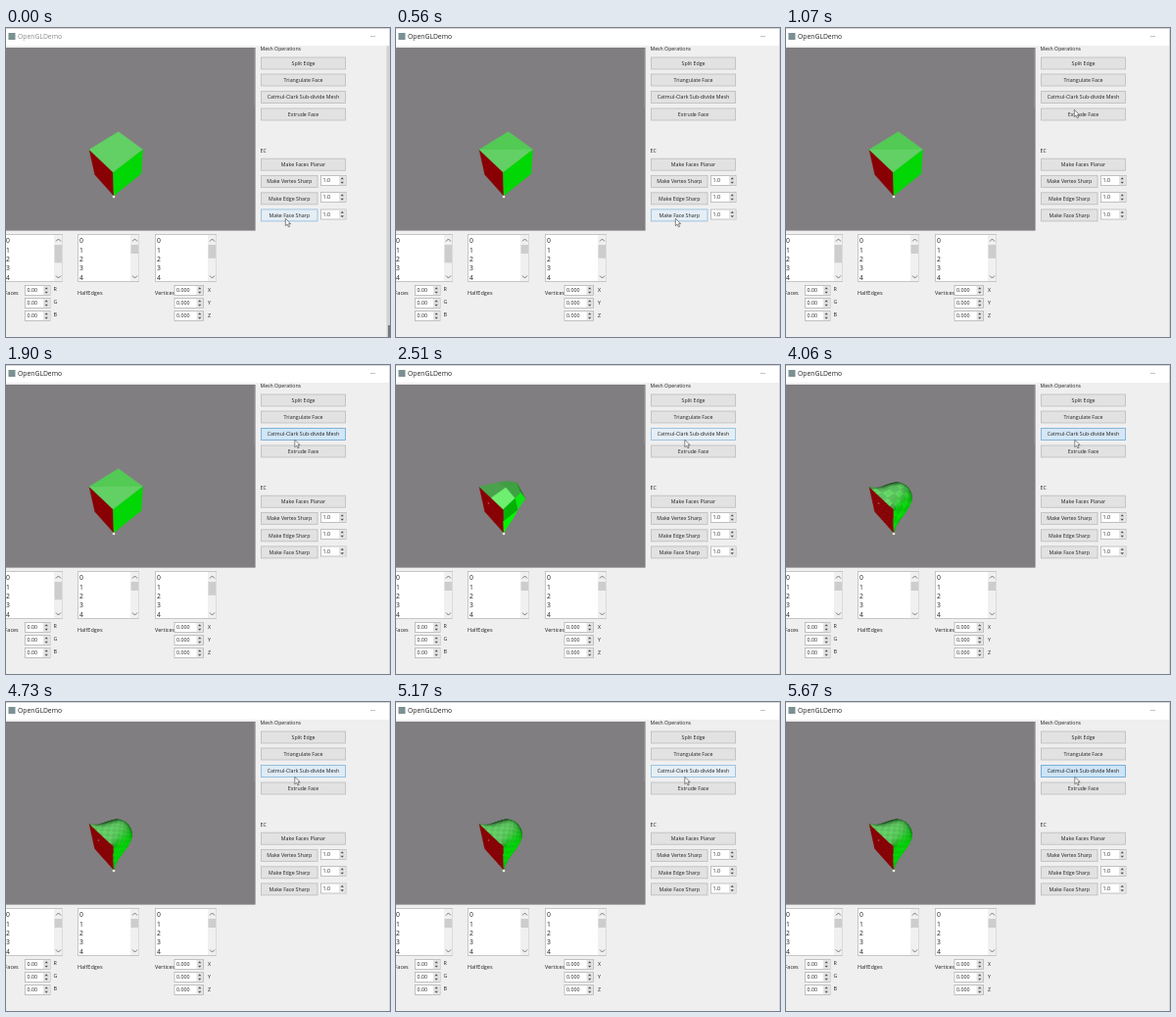
These frames come from a looping animation (392x315 px, 5770 ms). An HTML page:

```html
<!DOCTYPE html>
<html>
<head>
<meta charset="utf-8">
<style>
  html, body { margin: 0; width: 100%; height: 100%; overflow: hidden; background: #f0f0f0; }
  svg { display: block; width: 392px; height: 315px; font-family: "Open Sans", "Noto Sans", sans-serif; }
</style>
</head>
<body>
<svg id="stage" viewBox="0 0 392 315"></svg>
<script>
const LOOP = 5770;
const stage = document.getElementById('stage');

// ---- Widgets ----
const rect = (x, y, w, h, fill, extra = '') =>
  `<rect x="${x}" y="${y}" width="${w}" height="${h}" fill="${fill}" ${extra}/>`;
const text = (x, y, label, size = 5.3, extra = '') =>
  `<text x="${x}" y="${y + size * 0.36}" font-size="${size}" fill="#222" ${extra}>${label}</text>`;
const line = (d, color = '#777', width = 1) =>
  `<path d="${d}" fill="none" stroke="${color}" stroke-width="${width}"/>`;

function button(y, label, width = 86, id = '') {
  return rect(260.5, y - 6, width, 12, '#e2e2e2', `stroke="#c0c0c0" stroke-width=".9" ${id && `id="${id}"`}`) +
    text(260.5 + width / 2, y, label, 5.25, 'text-anchor="middle"');
}

function spinBox(x, y, width, value) {
  const arrowX = x + width - 4.5;
  return rect(x + .5, y - 5, width - 1, 10, '#fff', 'stroke="#b4b4b4" stroke-width=".8"') +
    rect(arrowX - 3, y - 4.6, 6.5, 9.2, '#e4e4e4') +
    text(x + 2.5, y, value) +
    `<path d="M${arrowX - 1.5} ${y - 1.3}l1.7-2l1.7 2zM${arrowX - 1.5} ${y + 1.3}l1.7 2l1.7-2z" fill="#555"/>`;
}

function listBox(x, width) {
  const bar = x + width - 9;
  return rect(x + .5, 210.5, width - 1, 48, '#fff', 'stroke="#bbb" stroke-width=".8"') +
    rect(bar, 211, 8.5, 47, '#f0f0f0') + rect(bar + .5, 221, 7.5, 9, '#cdcdcd', 'class="thumb"') +
    line(`M${bar + 2} 217.5l2.5-2.5l2.5 2.5M${bar + 2} 252.5l2.5 2.5l2.5-2.5`) +
    [0, 1, 2, 3, 4].map(n => text(x + 2, 217 + n * 9.3, n, 6.8)).join('');
}

const rows = [267.5, 280.5, 293.5];
const windowParts = [
  rect(0, 0, 392, 315, '#f0eff0'),
  rect(0, 0, 392, 18, '#fff'),
  rect(0, 0, 392, 1, '#d4d4d4'),
  rect(2.5, 5, 7, 7, '#7b9092'),
  text(12, 8.5, 'OpenGLDemo', 6.8, 'id="title"'),
  line('M372 8.5h5', '#aaa', .7),
  rect(0, 20, 254.6, 186.6, '#807e80'),
  line('M253.5 21v60', '#959395', .7),
  rect(391, 0, 1, 315, '#d5d5d5'),
  `<g id="edge">${rect(388.5, 18, 3.5, 297, '#d2d2d2')}${rect(390, 303, 2, 12, '#777')}</g>`,
  text(259.5, 21, 'Mesh Operations', 5.2),
  button(36, 'Split Edge'),
  button(53, 'Triangulate Face'),
  button(70.5, 'Catmul-Clark Sub-divide Mesh', 86, 'subdivideButton'),
  button(88, 'Extrude Face'),
  text(259.5, 125, 'EC'),
  button(139.2, 'Make Faces Planar'),
  button(156.4, 'Make Vertex Sharp', 57.5), spinBox(321, 155.5, 26.5, '1.0'),
  button(173.8, 'Make Edge Sharp', 57.5), spinBox(321, 172.5, 26.5, '1.0'),
  button(190.9, 'Make Face Sharp', 57.5, 'faceButton'), spinBox(321, 190, 26.5, '1.0'),
  listBox(-2, 60), listBox(73, 63), listBox(152, 63),
  text(-1.5, 270, 'Faces', 5.5), text(73, 270, 'HalfEdges', 5.5), text(152, 270, 'Vertices', 5.5),
  ...rows.flatMap((y, i) => [
    spinBox(19, y, 26.5, '0.00'), text(48.5, y - 1.5, 'RGB'[i]),
    spinBox(171.5, y, 30.5, '0.000'), text(206, y - .5, 'XYZ'[i])
  ])
];

// ---- Subdivision mesh, in unit-cube coordinates (u, v, w) ----
const average = list => [0, 1, 2].map(k => list.reduce((sum, p) => sum + p[k], 0) / list.length);
const onSharpFace = p => p[0] === 0;

const cube = {
  points: [...Array(8).keys()].map(i => [i >> 2, i >> 1 & 1, i & 1]),
  faces: [[0, 1, 3, 2], [4, 6, 7, 5], [0, 4, 5, 1], [2, 3, 7, 6], [0, 2, 6, 4], [1, 5, 7, 3]]
};

function subdivide({ points, faces }) {
  const centers = faces.map(face => average(face.map(i => points[i])));
  const edges = new Map();
  const around = points.map(() => ({ centers: [], mids: [] }));
  const edgeKey = (a, b) => Math.min(a, b) + '-' + Math.max(a, b);

  faces.forEach((face, f) => face.forEach((a, k) => {
    const b = face[(k + 1) % 4], key = edgeKey(a, b);
    around[a].centers.push(centers[f]);
    if (!edges.has(key)) {
      const mid = average([points[a], points[b]]);
      edges.set(key, { ends: [points[a], points[b]], mid, centers: [], index: points.length + faces.length + edges.size });
      around[a].mids.push(mid);
      around[b].mids.push(mid);
    }
    edges.get(key).centers.push(centers[f]);
  }));

  const moved = points.map((p, i) => {
    if (onSharpFace(p)) return p;
    const F = average(around[i].centers), R = average(around[i].mids), n = around[i].mids.length;
    return p.map((x, k) => (F[k] + 2 * R[k] + (n - 3) * x) / n);
  });
  const edgePoints = [...edges.values()].map(e =>
    e.ends.every(onSharpFace) ? e.mid : average([...e.ends, ...e.centers]));
  const edgeIndex = (a, b) => edges.get(edgeKey(a, b)).index;

  return {
    points: [...moved, ...centers, ...edgePoints],
    faces: faces.flatMap((face, f) => face.map((a, k) =>
      [a, edgeIndex(a, face[(k + 1) % 4]), points.length + f, edgeIndex(face[(k + 3) % 4], a)]))
  };
}

// Screen positions of the cube corners, in the order of cube.points
const corners = [[85, 124], [90.7, 149.5], [109.3, 147], [110, 171], [114.7, 105.7], [111, 121], [139.5, 123.7], [138, 148.5]];
const project = p => [0, 1].map(axis => corners.reduce((sum, corner, i) =>
  sum + corner[axis] * cube.points[i].reduce((weight, bit, k) => weight * (bit ? p[k] : 1 - p[k]), 1), 0));

const minus = (a, b) => a.map((x, k) => x - b[k]);
const cross = (a, b) => [a[1] * b[2] - a[2] * b[1], a[2] * b[0] - a[0] * b[2], a[0] * b[1] - a[1] * b[0]];
const RED = 'rgb(137,0,4)';
const sideColors = [[[0, 150, 0], [0, 80, 8]], [[8, 35, 12], [0, 215, 4]], [[98, 208, 100], [0, 110, 0]]];

// Sides turned away from the light darken quickly; alternate facets differ a little.
function shade(quad, normal, tint) {
  if (quad.every(onSharpFace)) return RED;
  const weights = normal.map((x, k) => x * x * (k === 1 && x < 0 ? 4 : 1));
  const total = weights[0] + weights[1] + weights[2];
  const rgb = [0, 1, 2].map(c => tint * normal.reduce((sum, x, k) =>
    sum + weights[k] / total * sideColors[k][x > 0 ? 1 : 0][c], 0));
  return `rgb(${rgb.map(Math.round)})`;
}

function drawMesh({ points, faces }, level) {
  const contrast = level ? .16 / level : 0;
  const quads = faces.map((face, f) => {
    const quad = face.map(i => points[i]), flat = quad.map(project);
    const [dx1, dy1] = minus(flat[2], flat[0]), [dx2, dy2] = minus(flat[3], flat[1]);
    const center = average(quad);
    const normal = cross(minus(quad[2], quad[0]), minus(quad[3], quad[1]));
    return {
      visible: dx1 * dy2 - dy1 * dx2 < 0,
      depth: .444 * center[0] - .627 * center[1] + center[2],
      flat, color: shade(quad, normal, 1 + (f % 2 ? contrast : -contrast))
    };
  }).filter(q => q.visible).sort((a, b) => b.depth - a.depth);
  const shapes = quads.map(q => {
    const path = q.flat.map(p => p.map(x => x.toFixed(2))).join(' ');
    return `<polygon points="${path}" fill="${q.color}" stroke="${q.color}" stroke-width=".4"/>`;
  });
  const mark = level ? '<circle cx="94.5" cy="141" r=".8" fill="#b66"/>' : '';
  return `<g class="mesh">${shapes.join('')}${mark}</g>`;
}

const meshes = [cube];
while (meshes.length < 5) meshes.push(subdivide(meshes[meshes.length - 1]));

stage.innerHTML = windowParts.join('') + meshes.map(drawMesh).join('') +
  '<path id="diagonal" d="M85 124L139.5 123.7L114.7 105.7z" fill="#0a0" opacity=".16"/>' +
  '<circle cx="110" cy="172" r="1.3" fill="#fff4e4"/>' +
  '<path id="cursor" d="M0 0v7.4l1.8-1.6l1.3 2.7l1.2-.5l-1.2-2.7h2.3z" fill="#fff" stroke="#555" stroke-width=".7"/>';

// ---- Timeline ----
const byId = id => document.getElementById(id);
const [title, edge, diagonal, cursor, faceButton, subdivideButton] =
  ['title', 'edge', 'diagonal', 'cursor', 'faceButton', 'subdivideButton'].map(byId);
const meshGroups = document.querySelectorAll('.mesh');
const thumbs = document.querySelectorAll('.thumb');
const progress = (t, from, to) => Math.min(1, Math.max(0, (t - from) / (to - from)));
const ease = x => x * x * (3 - 2 * x);
const mix = (a, b, x) => `rgb(${a.map((v, k) => Math.round(v + (b[k] - v) * x))})`;
const show = (element, visible) => element.style.display = visible ? '' : 'none';
const clicks = [2510, 3090, 3700, 4310];
const glows = [[2510, 3060], [3090, 3580], [3700, 4250], [4580, 5140], [5170, 5670]];
const GREY = [226, 226, 226], PALE = [229, 238, 245], BLUE = [204, 228, 246];
const GREY_EDGE = [192, 192, 192], PALE_EDGE = [150, 193, 222], BLUE_EDGE = [112, 170, 215];

function paintButton(element, fill, border) {
  element.setAttribute('fill', fill);
  element.setAttribute('stroke', border);
}

function render(t) {
  const level = clicks.filter(click => t >= click).length;
  meshGroups.forEach((group, i) => show(group, i === level));
  show(diagonal, t >= 60 && level === 0);
  show(edge, t < 60);
  title.setAttribute('fill', t < 60 ? '#888' : '#222');

  // Scroll thumbs shrink as the face, half-edge and vertex lists grow.
  const { faces, points } = meshes[level];
  [faces.length, faces.length * 4, points.length].forEach((count, i) =>
    thumbs[i].setAttribute('height', Math.max(9, 22 * 5 / count)));

  const rise = ease(progress(t, 640, 1070)), settle = ease(progress(t, 1210, 1440));
  cursor.setAttribute('transform', `translate(${285.3 + 9 * rise + .5 * settle} ${194.3 - 111 * rise - 7 * settle})`);

  const leave = progress(t, 660, 1000);
  paintButton(faceButton, mix(PALE, GREY, leave), mix(PALE_EDGE, GREY_EDGE, leave));

  const hover = progress(t, 1270, 1440);
  const glow = glows.filter(([start]) => t >= start).pop();
  const strength = glow ? progress(t, ...glow) : 1 - progress(t, 1810, 2360);
  const blend = (grey, pale, blue) => t < 1440 ? mix(grey, blue, hover) : mix(pale, blue, strength);
  paintButton(subdivideButton, blend(GREY, PALE, BLUE), blend(GREY_EDGE, PALE_EDGE, BLUE_EDGE));
}

function tick() {
  render(performance.now() % LOOP);
  requestAnimationFrame(tick);
}
tick();
</script>
</body>
</html>
```
